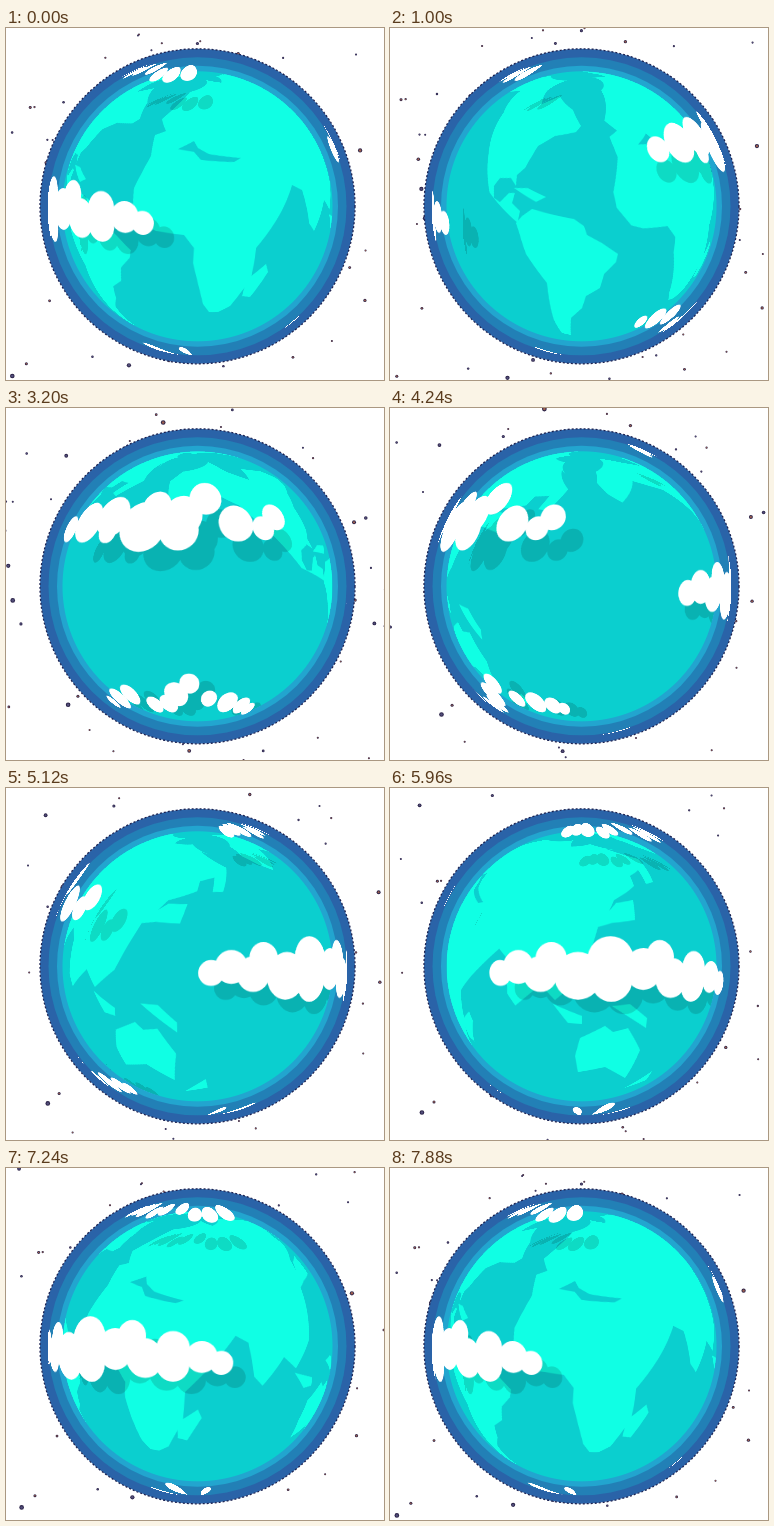
These frames come from a looping animation (378x352 px, 7.92 s). An HTML page with a canvas:

```html
<!DOCTYPE html>
<html lang="en">
<head>
<meta charset="utf-8">
<title>Spinning globe</title>
<style>
html, body { margin: 0; width: 100%; height: 100%; overflow: hidden; background: #fff; }
canvas { display: block; width: 378px; height: 352px; }
</style>
</head>
<body>
<canvas id="stage" width="378" height="352"></canvas>
<script>
const LOOP = 7920, STEP = 40, TAU = Math.PI * 2;
const CX = 191.5, CY = 178.3, R_LAND = 135, R_CLOUD = 150;
const TILT = 17 * Math.PI / 180;
const W = 1080, H = 540;
const ctx = document.getElementById('stage').getContext('2d');

// Coast outlines: each part is a moment of the spin plus x,y points seen on the disc.
const eurasia = [
  [0, [200,52, 184,64, 164,84, 156,91, 160,103, 149,107, 145,128, 128,160, 127,176, 138,197,
    150,203, 178,207, 188,220, 187,235, 197,276, 203,284, 212,284, 224,278, 245,250, 250,220,
    274,186, 286,157, 296,162, 303,195, 308,203, 318,172]],
  [5960, [165,212, 190,190, 208,139, 222,135, 245,132, 243,112, 226,115, 219,123, 224,112,
    244,98, 240,88, 248,82, 256,96, 263,94, 248,71]],
  [4240, [172,62]],
  [5960, [225,62, 200,56, 172,58]],
  [0, [240,56]]
];
const northAmerica = [
  [2240, [258,197, 215,175, 193,140, 172,100, 157,78, 122,86, 127,75, 140,64, 158,58, 190,55]],
  [1000, [158,62, 152,76, 170,68, 183,82, 191,98, 186,104, 165,108, 148,118, 135,140,
    127,147, 126,158, 121,150, 110,150, 104,158, 104,170, 110,174, 119,165, 125,165, 122,175,
    130,183, 128,192]]
];
const southAmerica = [[1000, [126,195, 132,188, 142,181, 184,191, 194,198, 197,207, 212,215,
  228,226, 226,234, 214,246, 210,260, 196,268, 192,280, 181,290, 181,307, 172,305, 164,292,
  157,255, 136,226, 129,204]]];
const cuba = [[1000, [124,160, 138,160, 156,169, 146,174]]];
const madagascar = [[0, [236,268, 240,252, 260,236, 262,244, 244,269]]];
const australia = [[5960, [185,268, 190,250, 215,238, 223,244, 238,240, 250,262, 235,290,
  215,279, 188,284]]];
const indonesia = [[5960, [163,216, 192,228, 192,236, 178,235]]];
const papua = [[5960, [222,218, 240,216, 257,230, 256,240]]];
const zealand = [[5960, [234,300, 262,283, 256,292]]];
const innerSea = [[0, [172,121, 188,113, 192,120, 203,126, 235,130, 228,134, 195,132, 188,124]]];

// Cloud puffs: moment, then x,y,radius triples.
const midClouds = [
  [5960, [110,185,13, 128,179,17, 150,186,18, 161,170,16, 188,188,24, 221,172,24, 222,193,21,
    254,181,21]],
  [6600, [199,168,16, 213,190,20, 242,180,17, 241,197,17, 268,189,16, 284,195,12]],
  [2240, [138,121,13, 168,114,20, 201,108,20, 200,124,11, 238,118,25, 245,98,15, 273,122,20]],
  [4240, [85,107,20, 108,90,16, 122,115,18, 147,120,12, 163,109,13]]
];
const polarClouds = [
  [0, [153,46,7, 166,46,8, 183,44,8]],
  [5960, [178,43,6, 187,41,6, 197,41,7]],
  [6600, [179,44,6, 190,41,6, 206,40,6]],
  [2240, [162,294,6, 178,291,10, 197,287,10, 217,297,8, 232,296,9, 246,287,12, 264,276,10]],
  [4240, [127,291,8, 146,295,10, 163,298,8, 174,301,6]],
  [6600, [171,324,4, 192,322,6, 215,324,4]]
];

function random(seed) {
  return () => {
    seed = (seed * 16807) % 2147483647;
    return seed / 2147483647;
  };
}

const rnd = random(4211);
const stars = Array.from({ length: 76 }, () => ({
  angle: rnd() * TAU, born: rnd() * LOOP, size: 1 + rnd() ** 3 * 1.4, warm: rnd() > 0.4
}));

// Disc point in unit coordinates to longitude and latitude; null beyond the limb.
function unproject(x, y, tilt) {
  const zz = 1 - x * x - y * y;
  if (zz < 0) return null;
  const z = Math.sqrt(zz), c = Math.cos(tilt), s = Math.sin(tilt);
  return [Math.atan2(x, z * c - y * s), Math.asin(Math.max(-1, Math.min(1, y * c + z * s)))];
}

function locate(px, py, radius, tilt) {
  let x = (px - CX) / radius, y = (CY - py) / radius;
  const d = Math.hypot(x, y);
  if (d > 0.995) { x *= 0.995 / d; y *= 0.995 / d; }
  return unproject(x, y, tilt);
}

const toU = lon => (lon / TAU + 0.5) * W;
const toV = lat => (0.5 - lat / Math.PI) * H;

// Paints a wrapped world map and returns its coverage values.
function makeMap(paint) {
  const c = document.createElement('canvas');
  c.width = W;
  c.height = H;
  const g = c.getContext('2d');
  for (let k = -2; k <= 2; k++) {
    g.setTransform(1, 0, 0, 1, k * W, 0);
    paint(g);
  }
  const data = g.getImageData(0, 0, W, H).data;
  const map = new Float32Array(W * H);
  for (let i = 0; i < map.length; i++) map[i] = data[i * 4 + 3] / 255;
  return map;
}

function fillShape(g, parts) {
  let last = null;
  g.beginPath();
  for (const [time, pts] of parts) {
    for (let i = 0; i < pts.length; i += 2) {
      let [lon, lat] = locate(pts[i], pts[i + 1], R_LAND, TILT);
      lon -= TAU * time / LOOP;
      lon += TAU * Math.round(((last ?? 0) - lon) / TAU);
      last = lon;
      g.lineTo(toU(lon), toV(lat));
    }
  }
  g.fill();
}

const landMap = makeMap(g => {
  for (const shape of [eurasia, northAmerica, southAmerica, cuba, madagascar, australia,
    indonesia, papua, zealand]) fillShape(g, shape);
  g.globalCompositeOperation = 'destination-out';
  fillShape(g, innerSea);
  g.globalCompositeOperation = 'source-over';
});

const cloudMap = makeMap(g => {
  for (const [time, puffs] of midClouds.concat(polarClouds)) {
    for (let i = 0; i < puffs.length; i += 3) {
      const [lon, lat] = locate(puffs[i], puffs[i + 1], R_CLOUD, 0);
      let shifted = lon + TAU * time / LOOP;
      shifted -= TAU * Math.round(shifted / TAU);
      const r = puffs[i + 2] / R_CLOUD / Math.cos(lat) * W / TAU;
      g.beginPath();
      g.arc(toU(shifted), toV(lat), r, 0, TAU);
      g.fill();
    }
  }
});

function sample(map, u, v) {
  u = ((u % W) + W) % W;
  v = Math.max(0, Math.min(H - 1.001, v));
  const x = Math.floor(u) % W, y = Math.floor(v), x2 = (x + 1) % W;
  const fx = u - Math.floor(u), fy = v - y, a = y * W, b = a + W;
  return (map[a + x] * (1 - fx) + map[a + x2] * fx) * (1 - fy)
       + (map[b + x] * (1 - fx) + map[b + x2] * fx) * fy;
}

// Fixed lookups for every pixel of the globe.
const SIZE = 304, X0 = 40, Y0 = 26;
const layer = document.createElement('canvas');
layer.width = layer.height = SIZE;
const layerCtx = layer.getContext('2d');
const image = layerCtx.createImageData(SIZE, SIZE);
const pixels = [];
const spot = (x, y, tilt) => {
  const p = unproject(x, y, tilt);
  return p && [toU(p[0]) - 0.5, toV(p[1]) - 0.5];
};
for (let j = 0; j < SIZE; j++) {
  for (let i = 0; i < SIZE; i++) {
    const dx = X0 + i + 0.5 - CX, dy = CY - (Y0 + j + 0.5), d = Math.hypot(dx, dy);
    if (d >= R_CLOUD) continue;
    const x = dx / R_LAND, y = dy / R_LAND;
    const onDisc = d < R_LAND;
    pixels.push({
      at: (j * SIZE + i) * 4,
      disc: Math.max(0, Math.min(1, R_LAND + 0.5 - d)),
      land: onDisc ? spot(x, y, TILT) : null,
      shade: onDisc ? spot(x - 16 / R_LAND, y + 16 / R_LAND, 0) : null,
      cloud: spot(dx / R_CLOUD, dy / R_CLOUD, 0)
    });
  }
}

const SEA = [11, 207, 207], LAND = [16, 255, 228];

// Land turns to the right, clouds to the left.
function drawSurface(t) {
  const shift = W * t / LOOP, out = image.data;
  for (const p of pixels) {
    const land = p.land ? sample(landMap, p.land[0] - shift, p.land[1]) : 0;
    const shade = p.shade ? 1 - 0.14 * sample(cloudMap, p.shade[0] + shift, p.shade[1]) : 1;
    const cloud = sample(cloudMap, p.cloud[0] + shift, p.cloud[1]);
    const alpha = cloud + p.disc * (1 - cloud);
    for (let k = 0; k < 3; k++) {
      const base = (SEA[k] + (LAND[k] - SEA[k]) * land) * shade;
      out[p.at + k] = alpha ? (255 * cloud + base * p.disc * (1 - cloud)) / alpha : 0;
    }
    out[p.at + 3] = alpha * 255;
  }
  layerCtx.putImageData(image, 0, 0);
  ctx.drawImage(layer, X0, Y0);
}

function disc(x, y, r, color) {
  ctx.beginPath();
  ctx.arc(x, y, r, 0, TAU);
  ctx.fillStyle = color;
  ctx.fill();
}

function drawStars(t) {
  for (const s of stars) {
    const age = (t + s.born) % LOOP;
    const r = R_CLOUD * Math.exp(0.000076 * age);
    const x = CX + r * Math.cos(s.angle), y = CY + r * Math.sin(s.angle);
    disc(x, y, s.size, '#2b2348');
    disc(x, y, s.size * 0.55, s.warm ? '#a0604f' : '#54507c');
  }
}

function draw(t) {
  ctx.fillStyle = '#fff';
  ctx.fillRect(0, 0, 378, 352);
  drawStars(t);
  disc(CX, CY, 157.5, '#2a63a8');
  ctx.strokeStyle = '#1d2352';
  ctx.lineWidth = 1.3;
  ctx.setLineDash([2, 2]);
  ctx.stroke();
  ctx.setLineDash([]);
  disc(CX, CY, 149, '#2280b6');
  disc(CX, CY, 140.5, '#22a5cf');
  drawSurface(t);
}

const start = performance.now();
let shown = -1;
function tick() {
  const t = Math.floor(((performance.now() - start) % LOOP) / STEP) * STEP;
  if (t !== shown) draw(shown = t);
  requestAnimationFrame(tick);
}
tick();
</script>
</body>
</html>
```
